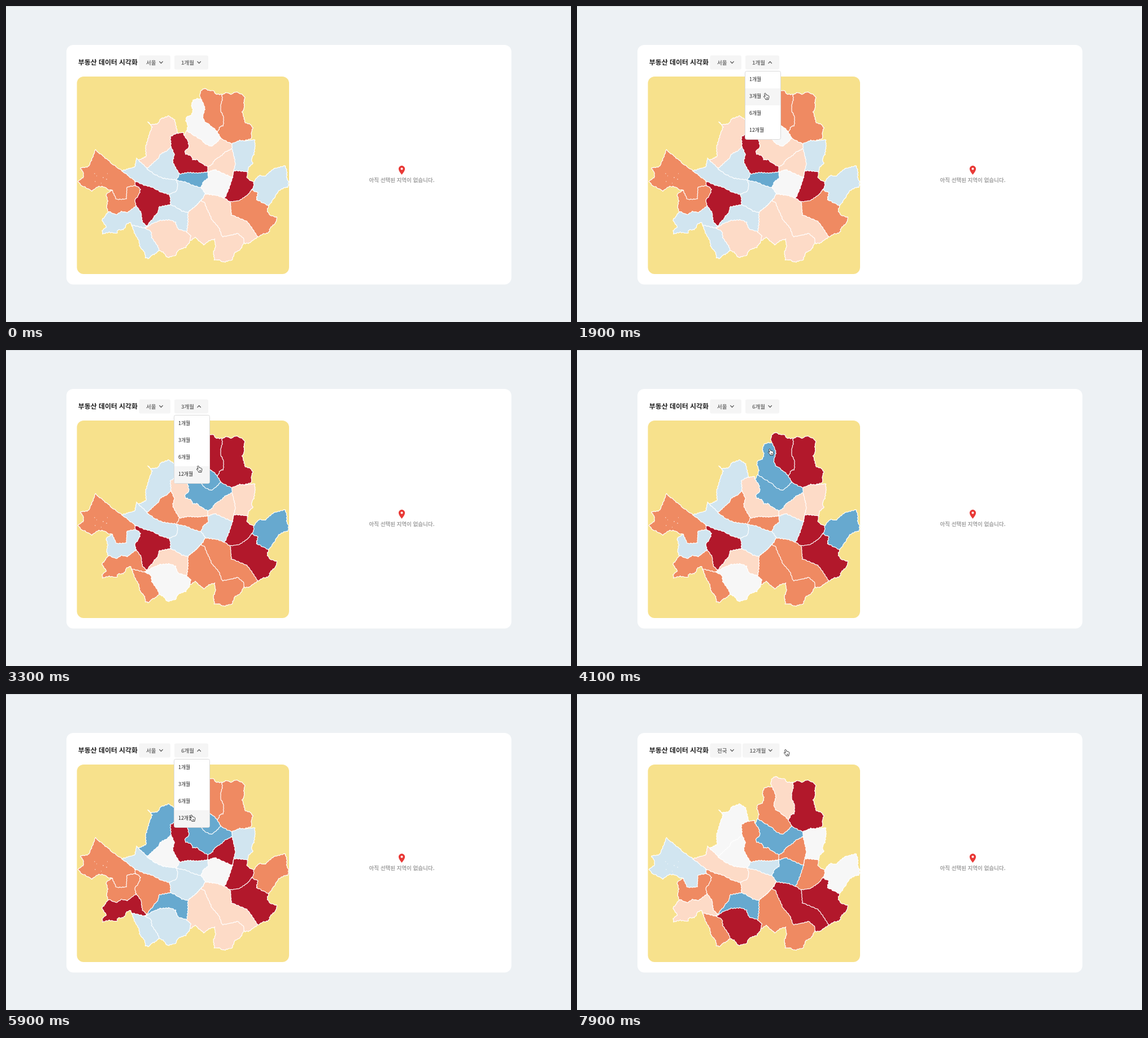
Write an HTML page that moves like this. It is 1000 px wide and 560 px high and loops after 8000 ms.

```html
<!DOCTYPE html>
<html lang="ko">
<head>
<meta charset="utf-8">
<style>
  html, body { margin: 0; width: 100%; height: 100%; overflow: hidden; background: #edf1f4; }
  svg { display: block; width: 100vw; height: 100vh; }
  text { font: 700 9.5px "Noto Sans CJK KR", "Noto Sans CJK", "Noto Sans", sans-serif; fill: #767676; }
  .title { font-size: 11.9px; fill: #1c1c1c; }
  .empty { fill: #a3a3a3; text-anchor: middle; }
  .panel text { font-size: 8.9px; font-weight: 500; fill: #222; }
  .button { fill: #f5f5f5; }
  .chevron { fill: none; stroke: #666; stroke-width: 1.3; stroke-linecap: round; stroke-linejoin: round; }
  #districts { stroke: #fff; stroke-width: 1.2; stroke-linejoin: round; }
</style>
</head>
<body>
<svg id="stage" viewBox="0 0 1000 560">
  <rect width="1000" height="560" fill="#edf1f4"/>
  <rect width="1000" height="1" fill="#d3d7da"/>
  <rect x="107" y="69" width="787.5" height="424.5" rx="12" fill="#fff"/>
  <rect x="125.5" y="125" width="375.5" height="350" rx="12" fill="#f7e18c"/>
  <text class="title" x="127.8" y="104.3">부동산 데이터 시각화</text>
  <path transform="translate(690.9 281.4) scale(.8)" fill="#e93a37" fill-rule="evenodd"
    d="M12 2C8.1 2 5 5.1 5 9c0 5.3 7 13 7 13s7-7.7 7-13c0-3.9-3.1-7-7-7zM12 6.5a2.5 2.5 0 0 1 0 5a2.5 2.5 0 0 1 0-5z"/>
  <text class="empty" x="700.5" y="312.3">아직 선택된 지역이 없습니다.</text>

  <!-- Later districts overlap earlier ones; data-fill has one colour key per period. -->
  <g id="districts">
    <polygon data-fill="OROR" points="382,157 391,153 398,157 407,152 416,156 423,161 421,170 422,180 418,188 421,197 423,207 431,209 437,216 434,224 435,235 424,238 412,245 398,250 372,246 372,200"/>
    <polygon data-fill="OROP" points="382,157 383,166 380,175 380,187 385,196 385,212 379,214 374,224 360,222 340,200 338,175 345,165 343,158 345,150 351,146 360,150 368,150 371,156"/>
    <polygon data-fill="WBBO" points="345,165 351,177 352,183 348,196 352,205 361,211 369,218 374,224 380,234 370,255 335,240 320,221 322,212 318,203 320,196 328,194 331,185 328,176 331,167 338,164"/>
    <polygon data-fill="PBBB" points="320,221 332,229 344,236 354,245 364,249 371,243 380,234 390,240 400,244 406,252 390,270 365,290 345,288 310,268 312,245 315,229"/>
    <polygon data-fill="PLBW" points="251,206 257,210 268,209 274,200 282,197 288,194 293,199 298,200 301,213 304,226 300,245 285,270 258,288 242,285 234,273 248,267 247,250 250,240 254,226 259,214"/>
    <polygon data-fill="LOWW" points="249,288 268,272 274,262 285,257 292,250 305,262 306,285 312,300 305,312 285,312 265,305"/>
    <polygon data-fill="RPRO" points="291,232 301,226 314,224 315,229 322,238 324,250 317,256 317,262 327,265 331,273 338,272 345,278 357,285 364,290 352,300 315,303 307,298 300,287 295,275 298,263 292,250"/>
    <polygon data-fill="LPLW" points="400,244 413,238 424,239 440,237 441,248 439,262 434,272 437,278 429,287 428,294 415,298 406,300 396,285 396,262 400,253"/>
    <polygon data-fill="PPRO" points="400,253 404,268 406,280 403,292 401,304 398,312 370,300 357,294 357,285 365,280 371,271 380,266 387,259"/>
    <polygon data-fill="RRRO" points="401,304 403,292 412,292 428,294 426,305 438,312 442,320 440,335 415,352 385,348 385,330"/>
    <polygon data-fill="WLWB" points="357,294 370,290 385,297 401,304 394,325 387,341 365,343 345,336 340,315 352,300"/>
    <polygon data-fill="LBOW" points="435,326 439,318 438,312 448,300 458,302 465,296 475,288 494,283 497,292 497,305 500,312 500,321 492,322 482,328 475,340 467,351 465,354 448,350 440,332"/>
    <polygon data-fill="ORRR" points="435,326 446,331 443,343 465,354 462,363 468,371 480,375 477,385 468,392 465,402 455,404 446,410 425,400 390,372 390,352 397,347 412,345 425,337"/>
    <polygon data-fill="POPR" points="353,333 375,336 387,341 397,347 399,370 413,376 425,381 434,391 446,410 437,415 432,420 423,421 410,412 380,412 355,380 345,355 346,343"/>
    <polygon data-fill="POPO" points="345,345 351,348 357,362 364,378 377,394 383,409 398,406 411,403 421,413 421,420 414,433 405,437 400,450 385,454 377,450 369,450 367,436 371,427 369,413 360,416 350,424 343,417 335,410 327,416 315,405 312,385 315,372 322,366 332,357"/>
    <polygon data-fill="BOLL" points="307,298 322,295 340,296 357,294 358,305 350,310 345,322 335,328 310,322 302,308"/>
    <polygon data-fill="LLLP" points="302,309 318,312 331,318 345,322 350,328 353,333 345,345 332,357 322,366 311,370 295,360 286,345 289,334 296,320"/>
    <polygon data-fill="LLLP" points="231,270 240,278 249,288 262,298 277,305 290,307 302,308 304,318 302,328 289,334 280,340 250,328 225,318 210,302 205,292 228,285"/>
    <polygon data-fill="OOOL" points="158,255 168,263 178,271 188,280 205,292 228,310 235,318 225,335 205,350 186,340 188,326 182,326 173,320 163,320 152,328 142,322 133,318 127,311 137,303 137,295 131,287 146,285 150,276 155,264"/>
    <polygon data-fill="OLOO" points="188,326 192,336 195,343 213,342 214,321 229,318 245,325 242,350 228,370 195,380 182,366 178,357 180,345 177,333"/>
    <polygon data-fill="RROO" points="228,310 243,317 258,321 275,330 289,334 291,340 291,352 285,362 275,380 249,392 235,385 225,370 230,354 228,344 236,333 238,324 229,318"/>
    <polygon data-fill="LPBB" points="249,390 258,379 269,365 271,356 291,352 300,356 311,363 322,366 322,385 320,400 310,410 265,395"/>
    <polygon data-fill="LORP" points="230,354 239,365 241,382 249,391 242,396 240,402 228,398 222,388 221,383 213,387 209,396 198,397 196,403 182,401 171,404 170,399 178,391 170,380 173,375 182,364 195,370 205,364 215,366 222,360"/>
    <polygon data-fill="PWLR" points="247,394 260,385 273,380 290,379 300,383 304,395 320,400 327,407 325,418 318,428 305,432 300,442 285,446 278,436 270,433 258,428 250,405"/>
    <polygon data-fill="LOLO" points="222,388 235,391 247,394 257,400 258,410 268,424 271,433 264,440 258,441 253,448 247,446 245,435 237,427 235,415 228,403"/>
  </g>
  <path stroke="#fff" stroke-opacity=".8" d="M156 297h1.5M160 301h1M171 304h2M177 307h2M157 311h1.5M168 314h1M179 297h1"/>

  <g id="menus"></g>
  <path id="cursor" fill="#fff" stroke="#222" stroke-width=".9" stroke-linejoin="round"
    d="M-2.8-5.3C-2-6-1-5.5-.8-4.6L-.1-2.2C.6-2.8 1.4-2.6 1.6-1.9C2.4-2.4 3.1-2 3.3-1.3C4.1-1.6 4.6-1 4.7-.2C5 1.8 4.6 3 4 4.2V5.6H-1.2V4.5C-2.5 3.3-3.3 1.8-4.4.8C-5-.1-4-1-3-.4L-1.9.5L-3.2-4C-3.4-4.6-3.2-5.1-2.8-5.3ZM.8 2V4M2.3 1.9V4"/>
</svg>
<script>
const LOOP = 8000, TICK = 100, ROW = 30, MENU_TOP = 116;
const COLORS = { R: "#b2182b", O: "#ef8a62", P: "#fddbc7", W: "#f7f7f7", L: "#d1e5f0", B: "#67a9cf" };
const PERIODS = ["1개월", "3개월", "6개월", "12개월"];
const REGIONS = ["전국", "서울"];

// time, x, y of the pointer
const POINTER = [
  [500, 425, 497], [600, 425, 497], [700, 400, 410], [800, 384, 336], [900, 384, 336],
  [1300, 350, 88], [1400, 342, 104], [1500, 342, 104], [1800, 335, 160], [2200, 335, 160.5],
  [2400, 341, 113], [2700, 341, 113], [2800, 342, 109], [3200, 342, 109], [3300, 342, 211],
  [3400, 342, 190], [3700, 342, 190], [4100, 343, 181], [4300, 345, 104], [5000, 345, 104],
  [5300, 408, 130], [5900, 330, 220], [6200, 330, 220], [6600, 271, 109], [7000, 271, 109],
  [7200, 274, 134], [7800, 274, 134], [7900, 371, 104]
];
const PERIOD_OPEN = [[1500, 2100], [2800, 3600], [4900, 6000]];
const REGION_OPEN = [[6900, 7500]];
const LABEL_CHANGES = [2100, 3600, 6000];
const MAP_CHANGES = [2300, 4300, 6200];

const $ = id => document.getElementById(id);
const countPassed = (times, t) => times.filter(time => t >= time).length;
const isOpen = (spans, t) => spans.some(([from, to]) => t >= from && t < to);

// A position-based wobble keeps shared borders together.
function roughen(shape) {
  const length = shape.getTotalLength(), points = [];
  for (let d = 0; d < length; d += 2.5) {
    const { x, y } = shape.getPointAtLength(d);
    points.push([x + .7 * Math.sin(x * .9 + y * 1.3), y + .7 * Math.sin(x * 1.2 - y * .8)]);
  }
  shape.setAttribute("points", points.join(" "));
}

function pointerAt(t) {
  const next = POINTER.findIndex(key => key[0] > t);
  if (next === 0) return null;
  if (next < 0) return POINTER.at(-1).slice(1);
  const [t0, x0, y0] = POINTER[next - 1], [t1, x1, y1] = POINTER[next];
  const k = (t - t0) / (t1 - t0);
  return [x0 + (x1 - x0) * k, y0 + (y1 - y0) * k];
}

function menu({ label, left, right, textX, chevronX, panelX, options, open }, pointer) {
  const [px, py] = pointer || [0, 0];
  const tip = open ? -1.5 : 1.5;
  let out = `<rect class="button" x="${left}" y="87.5" width="${right - left}" height="25" rx="3"/>
    <text x="${textX}" y="103.5">${label}</text>
    <path class="chevron" d="M${chevronX - 2.8} ${100 - tip}l2.8 ${2 * tip}l2.8 ${-2 * tip}"/>`;
  if (!open) return out;
  out += `<g class="panel"><rect x="${panelX}" y="115.5" width="63" height="${options.length * ROW + 1}" rx="3" fill="#fff" stroke="#d9d9d9"/>`;
  options.forEach((option, i) => {
    const y = MENU_TOP + i * ROW;
    if (px > panelX && px < panelX + 63 && py >= y && py < y + ROW)
      out += `<rect x="${panelX + .5}" y="${y}" width="62" height="${ROW}" fill="#f5f5f5"/>`;
    out += `<text x="${panelX + 7.5}" y="${y + 17.3}">${option}</text>`;
  });
  return out + "</g>";
}

const districts = [...document.querySelectorAll("#districts polygon")];
districts.forEach(roughen);

let lastTick = -1;
function draw(now) {
  const t = Math.floor(now % LOOP / TICK) * TICK;
  if (t !== lastTick) {
    lastTick = t;
    const pointer = pointerAt(t);
    const mapPeriod = countPassed(MAP_CHANGES, t), period = countPassed(LABEL_CHANGES, t);
    const wide = period === 3;
    districts.forEach(shape => shape.setAttribute("fill", COLORS[shape.dataset.fill[mapPeriod]]));
    $("menus").innerHTML = menu({
      label: REGIONS[t < 7500 ? 1 : 0], left: 235.5, right: 291, textX: 248, chevronX: 274.5,
      panelX: 235.5, options: REGIONS, open: isOpen(REGION_OPEN, t)
    }, pointer) + menu({
      label: PERIODS[period], left: wide ? 293 : 298, right: wide ? 358.5 : 358, textX: wide ? 305.5 : 310,
      chevronX: wide ? 342.3 : 341.7, panelX: 297.5, options: PERIODS, open: isOpen(PERIOD_OPEN, t)
    }, pointer);
    $("cursor").style.display = pointer ? "" : "none";
    if (pointer) $("cursor").setAttribute("transform", `translate(${pointer})`);
  }
  requestAnimationFrame(draw);
}
requestAnimationFrame(draw);
</script>
</body>
</html>
```
